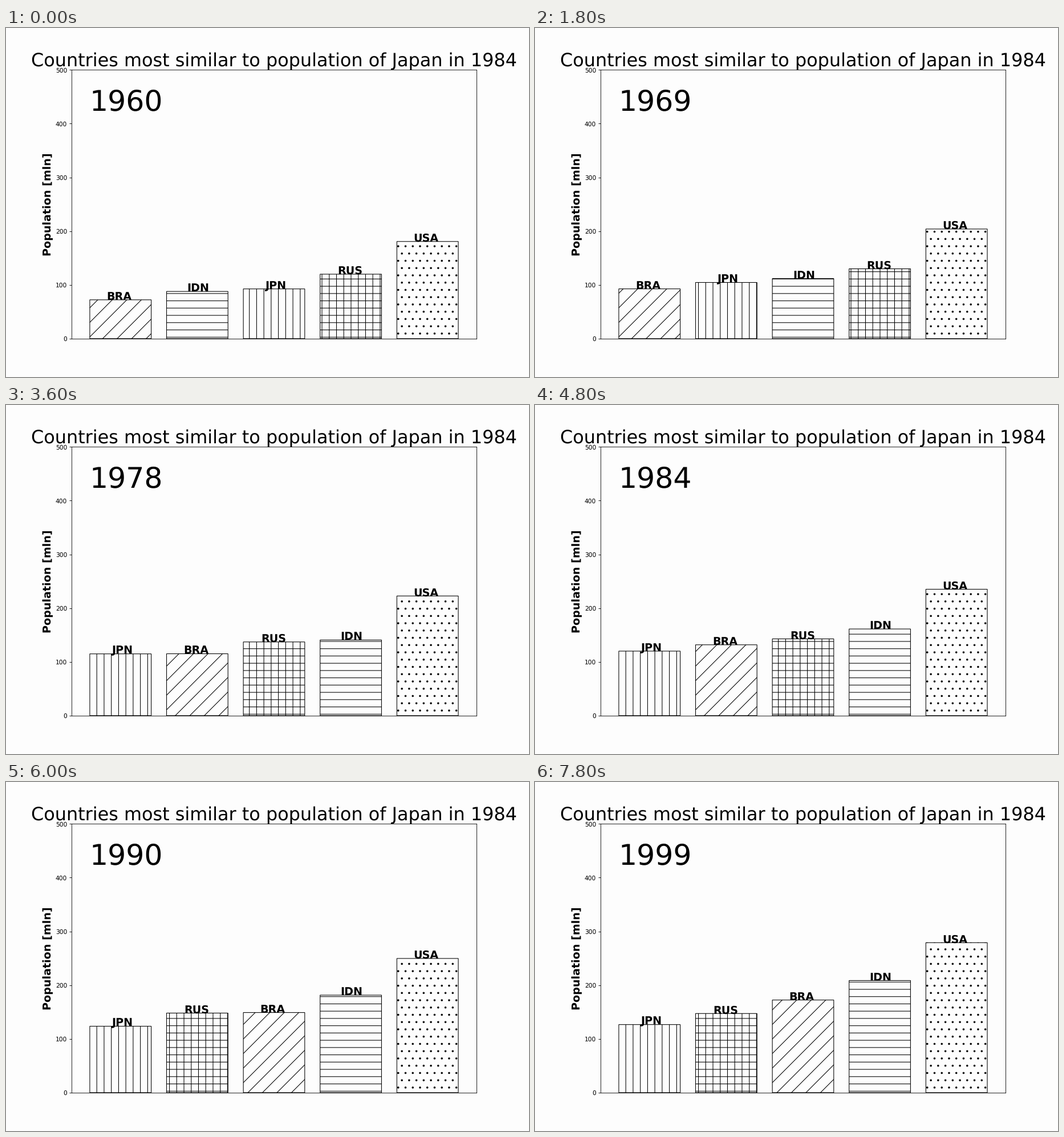
These frames come from a looping animation (917 by 611 pixels, 8000 ms). A matplotlib script:

```python
import numpy as np
import matplotlib.pyplot as plt
from matplotlib.animation import FuncAnimation
from matplotlib.collections import LineCollection
from matplotlib.textpath import TextPath
from matplotlib.transforms import IdentityTransform

W, H = 917, 611
DPI = 76.4167
PITCH = W / 72          # hatch spacing in pixels
PAPER = "#fdfdfd"
START, YEARS = 1960, 40
LABEL = dict(size=18, weight="bold")

# Population in millions at a few key years; a smooth curve joins them
KEY_YEARS = np.array([1960, 1964, 1978, 1990, 1999])
POPULATION = {
    "BRA": [72.2, 81.2, 115.1, 149.0, 172.3],
    "IDN": [87.8, 97.6, 140.7, 181.4, 208.6],
    "JPN": [92.5, 97.8, 114.9, 123.5, 126.6],
    "RUS": [119.9, 125.4, 137.1, 148.0, 147.2],
    "USA": [180.7, 191.9, 222.6, 249.6, 279.0],
}
CURVES = {name: np.polyfit(KEY_YEARS - START, values, 4)
          for name, values in POPULATION.items()}


def rows():
    ys = H - PITCH * (np.arange(H // PITCH + 1) + 0.5)
    return [[(0, y), (W, y)] for y in ys]


def columns():
    xs = PITCH * (np.arange(W // PITCH + 1) + 0.5)
    return [[(x, 0), (x, H)] for x in xs]


def diagonals():
    sums = 2 * PITCH * np.arange((W + H) // (2 * PITCH) + 1)
    return [[(s - H, 0), (s, H)] for s in sums]


def dots():
    marks = []
    for r in range(int(H / PITCH) + 1):
        for c in range(int(W / PITCH) + 1):
            x, y = (c + r % 2 / 2) * PITCH, H - r * PITCH
            marks.append([(x - 0.02, y), (x + 0.02, y)])
    return marks


HATCHES = {"BRA": diagonals(), "IDN": rows(), "JPN": columns(),
           "RUS": rows() + columns(), "USA": dots()}

plt.rcParams["text.hinting"] = "no_hinting"
fig, ax = plt.subplots(figsize=((W + 0.01) / DPI, (H + 0.01) / DPI), dpi=DPI,
                       facecolor=PAPER)
ax.set_facecolor(PAPER)
ax.set_xticks([])
ax.set_yticks(range(0, 501, 100))
ax.set_ylabel("Population [mln]", labelpad=3.3, **LABEL)
ax.set_title("Countries most similar to population of Japan in 1984", fontsize=30)
year_text = ax.text(-0.4, 425, "", fontsize=47.6)


def label_shift(name):
    """Offset from the bar centre that makes all labels end at the same place."""
    path = TextPath((0, 0), name, size=LABEL["size"] * DPI / 72,
                    prop={"weight": LABEL["weight"]})
    return 0.144 - path.get_extents().x1 * 5.28 / ax.bbox.width


bars, hatches, labels, shifts = {}, {}, {}, {}
for name, lines in HATCHES.items():
    bars[name] = ax.bar(0, 1, 0.8, facecolor=PAPER, edgecolor="black",
                        linewidth=1, snap=False)[0]
    hatch = LineCollection(lines, colors="black", capstyle="round",
                           linewidths=3.4 if name == "USA" else 1,
                           transform=IdentityTransform(), zorder=2)
    hatch.set_snap(False)
    hatches[name] = ax.add_collection(hatch, autolim=False)
    labels[name] = ax.text(0, 0, name, **LABEL)
    shifts[name] = label_shift(name)

ax.set_xlim(-0.64, 4.64)
ax.set_ylim(0, 500)


def update(i):
    year_text.set_text(str(START + i))
    values = {name: np.polyval(curve, i) for name, curve in CURVES.items()}
    for slot, name in enumerate(sorted(values, key=values.get)):
        value, bar = values[name], bars[name]
        bar.set_x(slot - 0.4)
        bar.set_height(value)
        hatches[name].set_clip_path(bar)
        labels[name].set_position((slot + shifts[name], value))
    return [year_text, *bars.values(), *hatches.values(), *labels.values()]


anim = FuncAnimation(fig, update, frames=YEARS, interval=200, repeat=True,
                     repeat_delay=0, blit=False)
plt.show()
```
